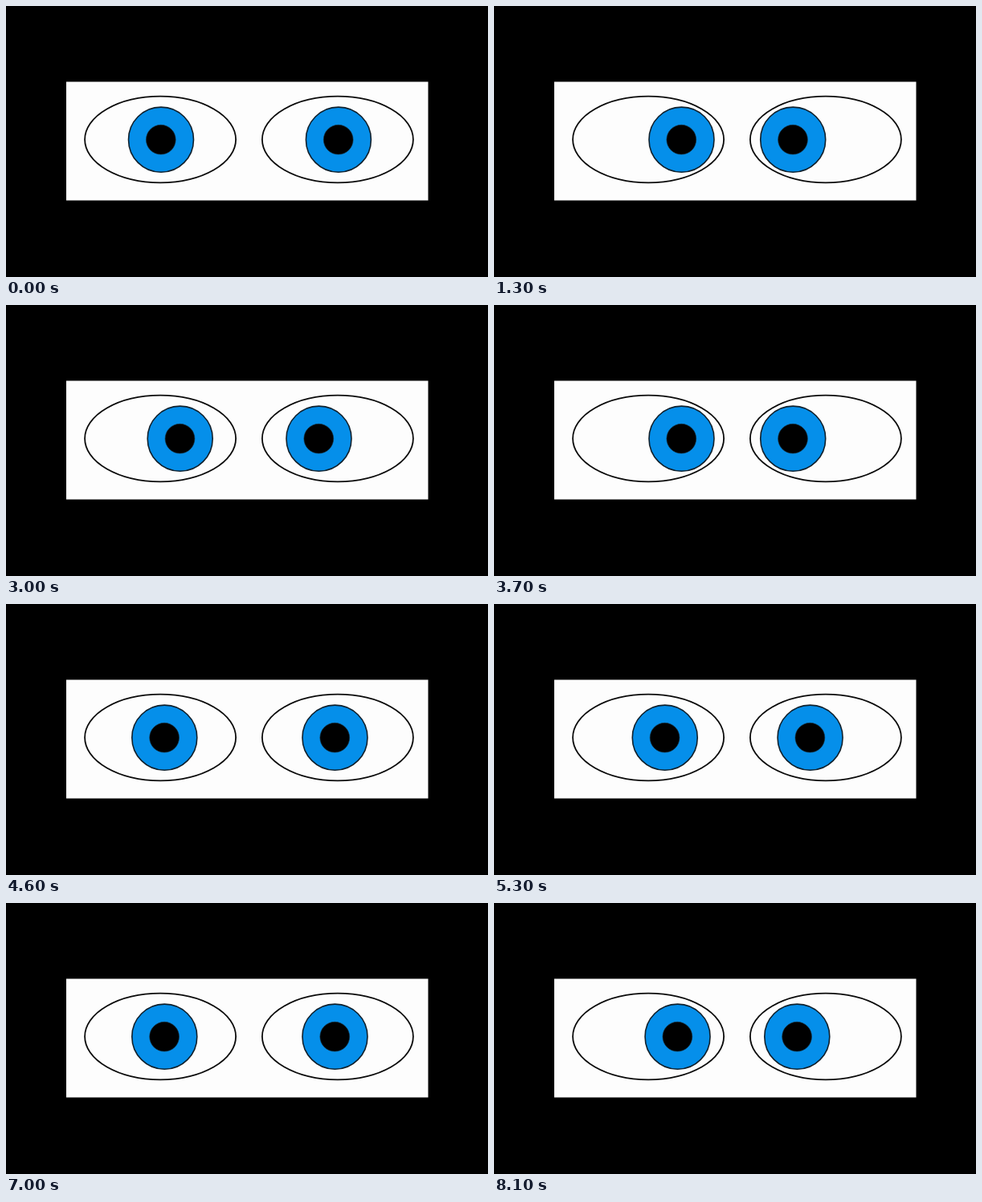
Animation of 600 by 338 pixels, one loop 8.2 s. Source, as an HTML page with a canvas:

```html
<!DOCTYPE html>
<html lang="en">
<head>
<meta charset="utf-8">
<title>Eyes</title>
<style>
html, body { margin: 0; width: 100%; height: 100%; overflow: hidden; background: #000; }
canvas { display: block; width: 600px; height: 338px; }
</style>
</head>
<body>
<canvas id="stage" width="600" height="338"></canvas>
<script>
const ctx = document.getElementById('stage').getContext('2d');
const LOOP = 8200, STEP = 100, SWEEP = 24;
const CY = 166.7;

function oval(x, y, rx, ry, fill, line, width) {
  ctx.beginPath();
  ctx.ellipse(x, y, rx, ry, 0, 0, Math.PI * 2);
  if (fill) {
    ctx.fillStyle = fill;
    ctx.fill();
  }
  if (line) {
    ctx.strokeStyle = line;
    ctx.lineWidth = width;
    ctx.stroke();
  }
}

// Steady sweep towards the nose and back, with a short rest at each end.
function inward(step) {
  const k = step % SWEEP;
  return Math.max(0, Math.min(3.95 * k, 44.5 - 4.02 * (k - 12)));
}

function eye(x, irisX) {
  oval(x, 166.5, 94, 53.8, null, '#0a0a0a', 1.8);
  oval(irisX, CY, 40.5, 40.6, '#058fea', '#10202c', 1.6);
  oval(irisX - 0.2, CY, 18.4, 18.4, '#000', '#1c2f3c', 0.6);
}

function draw(now) {
  const d = inward(Math.floor((now % LOOP) / STEP));
  ctx.fillStyle = '#000';
  ctx.fillRect(0, 0, 600, 338);
  ctx.fillStyle = '#fdfdfd';
  ctx.fillRect(75, 94.5, 450.5, 148);
  eye(192.1, 193 + d);
  eye(412.9, 413.9 - d * 1.03);
}

let start;
function tick(now) {
  start ??= now;
  draw(now - start);
  requestAnimationFrame(tick);
}
draw(0);
requestAnimationFrame(tick);
</script>
</body>
</html>
```
